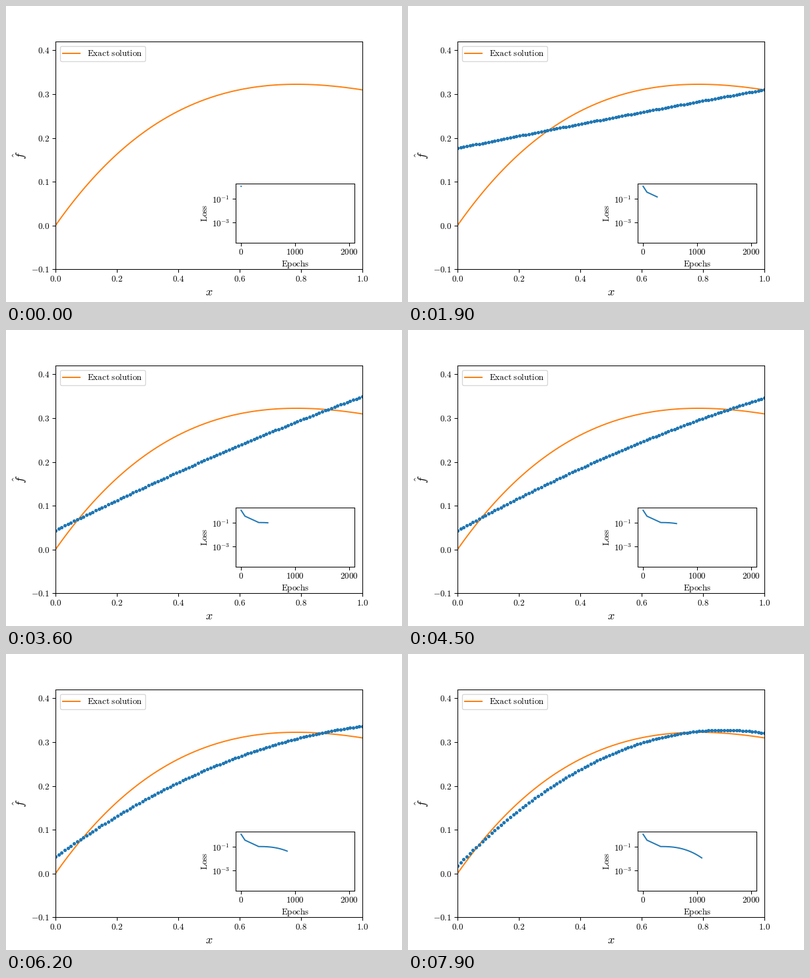
These frames come from a looping animation (600 by 450 pixels, 8 s). A matplotlib script:

```python
import numpy as np
import matplotlib.pyplot as plt
from matplotlib.animation import FuncAnimation

FRAMES = 80
INTERVAL = 100
EPOCHS_PER_FRAME = 13.75
PEAK_AT, SETTLE_AT = 5, 30.5

# Left and right end of the fitted curve at each stage of training
START = np.array([-0.19, -0.50])
PEAK = np.array([0.357, 0.253])
SETTLED = np.array([0.044, 0.353])

plt.rcParams["mathtext.fontset"] = "cm"
plt.rcParams["axes.labelpad"] = 3


def roman(text):
    return r"$\mathrm{%s}$" % text.replace(" ", r"\ ")


def numbers(values, fmt):
    return ["$%s$" % (fmt % v) for v in values]


def fit(x, frame):
    """Line that swings up, settles, then bends towards the solution."""
    rise = np.sin(np.pi / 2 * min(frame / PEAK_AT, 1))
    u = np.clip((frame - PEAK_AT) / (SETTLE_AT - PEAK_AT), 0, 1)
    settle = (1 - np.cos(np.pi * u)) / 2
    left, right = START + (PEAK - START) * rise + (SETTLED - PEAK) * settle

    s = frame / (FRAMES - 1)
    bend = s**2.8
    left -= 0.026 * s**6
    right -= 0.0325 * bend
    return left + (right - left) * x + 0.41 * bend * x * (1 - x)


def loss_at(epoch):
    """Two straight drops on the log scale, then an accelerating fall."""
    drops = np.interp(epoch, [0, 71, 325], [0.08, -0.42, -0.96])
    fall = 0.96 * (np.maximum(epoch - 325, 0) / 761) ** 2.5
    return 10 ** (drops - fall)


fig = plt.figure(figsize=(6.4, 4.8), dpi=93.75, facecolor="white")

ax = fig.add_axes([0.125, 0.1105, 0.775, 0.7695])
x = np.linspace(0, 1, 100)
ax.plot(x, np.exp(-x) * np.sin(x), color="C1", label=roman("Exact solution"))
dots, = ax.plot([], [], ".", color="C0")
ax.set(xlim=(0, 1), ylim=(-0.1, 0.42))
xticks = np.arange(6) / 5
yticks = np.arange(-1, 5) / 10
ax.set_xticks(xticks, numbers(xticks, "%.1f"))
ax.set_yticks(yticks, numbers(yticks, "%.1f"))
ax.set_xlabel("$x$", fontsize=14)
ax.set_ylabel(r"$\hat{f}$", fontsize=14)
ax.legend(loc="upper left", borderpad=0.37)

inset = fig.add_axes([0.58, 0.2, 0.3, 0.2])
loss, = inset.plot([], [], color="C0")
inset.set_yscale("log")
inset.set(xlim=(-100, 2100), ylim=(2e-5, 2))
inset.set_xticks([0, 1000, 2000], numbers([0, 1000, 2000], "%d"))
inset.set_yticks([1e-3, 1e-1], numbers([-3, -1], "10^{%d}"))
inset.minorticks_off()
inset.tick_params(axis="x", pad=2.8)
inset.set_xlabel(roman("Epochs"), labelpad=2)
inset.set_ylabel(roman("Loss"))


def update(frame):
    dots.set_data(x, fit(x, frame))
    epochs = np.linspace(0, max(1, frame * EPOCHS_PER_FRAME), 2 + 4 * frame)
    loss.set_data(epochs, loss_at(epochs))
    return dots, loss


anim = FuncAnimation(fig, update, frames=FRAMES, interval=INTERVAL,
                     repeat=True, repeat_delay=0, blit=False)
plt.show()
```
